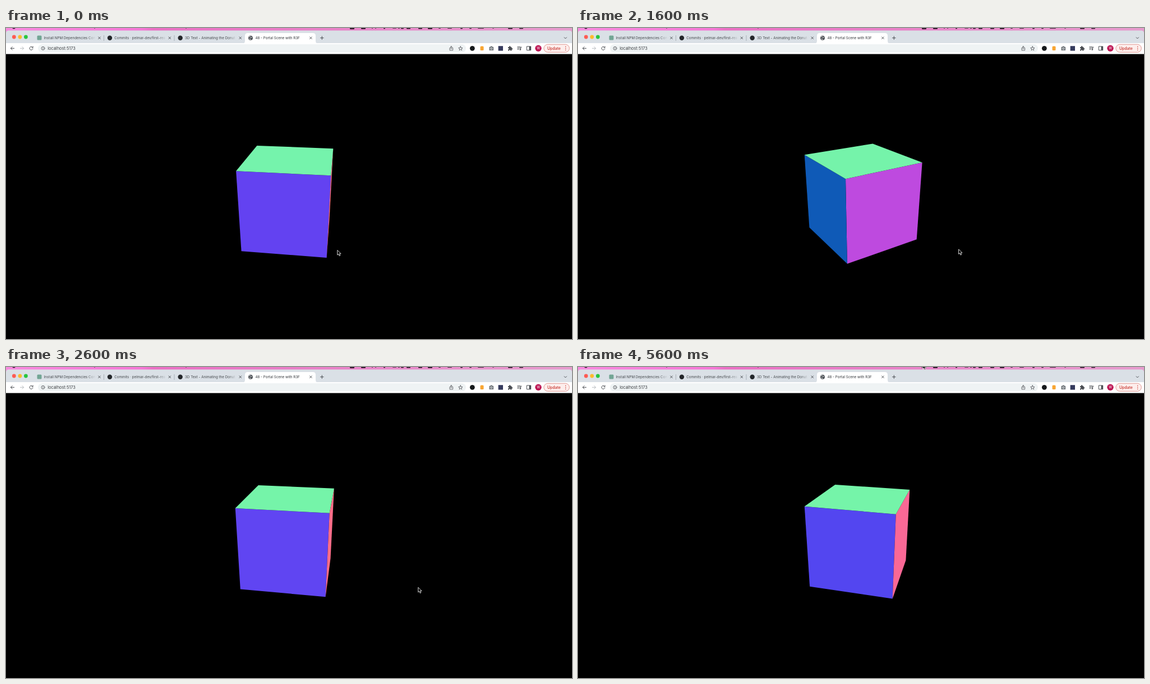
Write an HTML page that moves like this. It is 1009 px wide and 555 px high and loops after 5700 ms.

```html
<!DOCTYPE html>
<html lang="en">
<head>
<meta charset="utf-8">
<title>Portal Scene</title>
<style>
  html, body { margin: 0; width: 100%; height: 100%; overflow: hidden; background: #000; }
  svg { display: block; width: 1009px; height: 555px; }
  text { font-family: Inter, Roboto, sans-serif; font-size: 6.25px; }
  .line { fill: none; stroke: #484b50; stroke-width: 1; stroke-linecap: round; stroke-linejoin: round; }
  .thin { stroke-width: .8; }
</style>
</head>
<body>
<svg viewBox="0 0 1009 555">
  <defs>
    <linearGradient id="menu">
      <stop offset="0" stop-color="#f78ade"/>
      <stop offset=".24" stop-color="#f578d6"/>
      <stop offset=".26" stop-color="#ea70c4"/>
      <stop offset="1" stop-color="#e69ccd"/>
    </linearGradient>
  </defs>

  <!-- menu bar -->
  <rect width="1009" height="10" fill="url(#menu)"/>
  <circle cx="14" cy="-1.5" r="3" fill="#2c1026"/>
  <g id="marks" fill="#301a2b"></g>

  <!-- tab strip -->
  <path d="M0 28V9.500q0-5 5-5H1004q5 0 5 5V28z" fill="#dae0e6"/>
  <circle cx="14.3" cy="16" r="3.4" fill="#fe5b53"/>
  <circle cx="24.9" cy="16" r="3.4" fill="#fdbb2e"/>
  <circle cx="35.4" cy="16" r="3.4" fill="#28c63f"/>
  <path d="M421 28q5 0 5-5V14q0-5 5-5H547q5 0 5 5V23q0 5 5 5z" fill="#fff"/>
  <path d="M174.5 13v10M300 13v10" stroke="#9ea4ab" stroke-width=".8"/>
  <rect x="55.5" y="13.5" width="8" height="8" rx="1.5" fill="#72a594"/>
  <circle cx="185" cy="17.7" r="4.2" fill="#23262a"/>
  <circle cx="310.7" cy="17.7" r="4.2" fill="#23262a"/>
  <circle cx="436" cy="17.7" r="4" fill="#4b4f54"/>
  <path d="M433 16.2q2.2-2 3 .2t2.8-.4M433.6 19.6q2.2-1 2.6 1.4" fill="none" stroke="#fff" stroke-width=".9"/>
  <g id="tabs"></g>
  <path class="line" d="M560.5 17.7h5.6M563.3 14.9v5.6M995.2 16.8l2.1 2.1 2.1-2.1"/>

  <!-- toolbar -->
  <rect y="27" width="1009" height="20" fill="#fff"/>
  <rect x="57" y="29" width="763" height="14.6" rx="7.3" fill="#eff3f4"/>
  <path class="line" d="M14.6 36.3H8.5M11.2 33.5L8.4 36.3l2.8 2.8"/>
  <path class="line" style="stroke:#b9bdc1" d="M25.4 36.3h6.1M28.8 33.5l2.8 2.8-2.8 2.8"/>
  <path class="line" d="M47.4 34.4A3 3 0 1 0 48 37M48.1 33v2h-2"/>
  <circle class="line thin" cx="66" cy="36.3" r="3"/>
  <path class="line thin" d="M66 36v1.8M66 34.6v.1"/>
  <text x="74.2" y="38.8" fill="#3a3d41" style="font-size:7.4px">localhost:5173</text>
  <path class="line thin" d="M792.6 35.4H791V39.8h5.6V35.4H795M793.8 37.6v-5M792.3 34l1.5-1.5 1.5 1.5"/>
  <path class="line thin" d="M810.3 32.8l1 2.5 2.7.2-2.1 1.7.7 2.6-2.3-1.4-2.3 1.4.7-2.6-2.1-1.7 2.7-.2z"/>

  <!-- extensions -->
  <circle cx="831.3" cy="36.3" r="4.4" fill="#16191b"/>
  <rect x="845.5" y="32.5" width="6" height="7.5" rx="1.5" fill="#f8a533"/>
  <path d="M861.5 33.7h1.8l.8-1.2h2.4l.8 1.2h1.8v6.4h-7.6z" fill="#70767a"/>
  <circle cx="865.3" cy="36.8" r="1.6" fill="#70767a" stroke="#fff" stroke-width=".8"/>
  <rect x="877.6" y="32.2" width="8.4" height="8.4" fill="#353a5c"/>
  <path d="M895 34h2q-.3-2 1.2-2t1.2 2h2v2.1q1.8-.2 1.8 1.2t-1.8 1.2v2H899.2q.1-1.5-1-1.5t-1.1 1.5H895V38.3q1.5.1 1.5-1.1t-1.5-1.1z" fill="#484b50"/>
  <path class="line" d="M911.8 33.7h5M911.8 35.9h5M911.8 38.1h2.5M917.6 38.5v-4.3h1.5"/>
  <circle cx="916.8" cy="38.6" r="1.2" fill="#484b50"/>
  <rect class="line" x="928.7" y="32.9" width="7" height="6.8"/>
  <rect x="932.6" y="33" width="3" height="6.6" fill="#484b50"/>
  <circle cx="949" cy="36.3" r="5.7" fill="#bd1553"/>
  <text x="949" y="38.4" fill="#fff" text-anchor="middle" style="font-size:5.8px">W</text>
  <rect x="958.8" y="29.3" width="45.5" height="14" rx="7" fill="#fdeeec" stroke="#dd8e87" stroke-width=".9"/>
  <text x="965" y="38.8" fill="#c5302a" style="font-size:6.9px;font-weight:500">Update</text>
  <path d="M997.6 33.3v.01M997.6 36.3v.01M997.6 39.3v.01" stroke="#c5302a" stroke-width="1.5" stroke-linecap="round"/>

  <!-- page -->
  <rect y="46.5" width="1009" height="509" fill="#000"/>
  <g id="cube"></g>
  <path id="cursor" d="M0 0V8.6L1.9 6.8 3.4 10.2 5 9.5 3.6 6.3H6.3Z" fill="#000" stroke="#fff" stroke-width=".85" stroke-linejoin="round"/>
</svg>
<script>
const NS = 'http://www.w3.org/2000/svg';
const $ = id => document.getElementById(id);
const add = (parent, tag, attrs, text) => {
  const el = document.createElementNS(NS, tag);
  for (const k in attrs) el.setAttribute(k, attrs[k]);
  if (text) el.textContent = text;
  return parent.appendChild(el);
};

// Status icons cut off by the top edge: x, width, height
[[613, 8, 2.2], [633, 8, 2], [652, 2, 1], [658, 2, 1], [673, 3, 1.5], [689, 7, .8], [699, 3, 1],
 [704, 5, 1.4], [714, 7, 1.8], [735, 7, 1.8], [752, 8, 2], [771, 4, 1], [787, 8, 1], [810, 4, 1.4],
 [826, 4, 1.2], [841, 11, .9], [867, 3, .8], [895, 8, 1.8], [915, 7, 1.4], [157, 2, .8], [320, 2, .8]]
  .forEach(([x, w, h]) => add($('marks'), 'rect', { x, y: -2, width: w, height: h + 2, rx: 1 }));

// Tabs: text start, close button, title
[[67.7, 166.5, 'Install NPM Dependencies Com'],
 [193.3, 291.8, 'Commits · pelmar-dev/first-rea'],
 [319, 417.7, '3D Text - Animating the Donut'],
 [444.4, 543.4, '48 - Portal Scene with R3F']].forEach(([x, close, title], i) => {
  const fade = add($('tabs'), 'linearGradient',
    { id: 'fade' + i, gradientUnits: 'userSpaceOnUse', x1: x + 77, x2: x + 92 });
  const color = i < 3 ? '#43474b' : '#2f3236';
  add(fade, 'stop', { offset: 0, 'stop-color': color });
  add(fade, 'stop', { offset: 1, 'stop-color': color, 'stop-opacity': i < 3 ? 0 : 1 });
  add($('tabs'), 'text', { x, y: 20, fill: `url(#fade${i})` }, title);
  add($('tabs'), 'path', { class: 'line', d: `M${close - 1.8} 15.9l3.6 3.6m0-3.6l-3.6 3.6` });
});

// Monotone cubic through [time, value] points
function track(points) {
  const slope = points.slice(1).map((p, i) => (p[1] - points[i][1]) / (p[0] - points[i][0]));
  const tangent = points.map((_, i) => {
    const a = slope[i - 1] || 0, b = slope[i] || 0;
    return a * b > 0 ? 2 * a * b / (a + b) : 0;
  });
  return t => {
    if (t >= points[points.length - 1][0]) return points[points.length - 1][1];
    const i = points.findIndex(p => p[0] > t) - 1;
    const [t0, v0] = points[i], [t1, v1] = points[i + 1];
    const h = t1 - t0, u = (t - t0) / h, w = 1 - u;
    return v0 * w * w * (1 + 2 * u) + v1 * u * u * (3 - 2 * u)
      + h * u * w * (tangent[i] * w - tangent[i + 1] * u);
  };
}

const LOOP = 5700, STEP = 100, RELEASE = 1988;
const REST = { turn: 15.3, tilt: 22.5 };
const dragTurn = track([[0, 7.9], [600, 7.6], [1000, 5.5], [1300, -.9], [1600, -32.3], [1800, -42], [RELEASE, -44]]);
const dragTilt = track([[0, 24.1], [1300, 24.3], [1600, 23.3], [RELEASE, 24]]);
const cursorX = track([[0, 590.8], [1000, 598], [1300, 625.6], [1600, 678.6], [1800, 703], [2100, 734.8],
  [4700, 734.8], [4800, 735.8], [5000, 742], [5200, 700], [5400, 614.5]]);
const cursorY = track([[0, 396.5], [1300, 395.5], [1600, 394.9], [2100, 393.3],
  [4700, 393.3], [4800, 394], [5000, 444], [5200, 230], [5400, -5]]);

// Underdamped spring from 1 to 0
const MASS = 3.6, TENSION = 400, FRICTION = 26;
function spring(s) {
  const decay = FRICTION / (2 * MASS), w = Math.sqrt(TENSION / MASS - decay * decay);
  return Math.exp(-decay * s) * (Math.cos(w * s) + decay / w * Math.sin(w * s));
}

function pose(t) {
  if (t < RELEASE) return [dragTurn(t), dragTilt(t)];
  const k = spring((t - RELEASE) / 1000);
  return [REST.turn + (dragTurn(RELEASE) - REST.turn) * k,
          REST.tilt + (dragTilt(RELEASE) - REST.tilt) * k];
}

const HALF = .75, DIST = 6.403, FOCAL = 618.5, CX = 505, CY = 302.7;
const rad = deg => deg * Math.PI / 180;
const faces = Array.from({ length: 5 }, () => add($('cube'), 'polygon', {}));

function drawCube(turn, tilt) {
  const c = Math.cos(rad(tilt)), s = Math.sin(rad(tilt));
  const view = (x, y, z) => [x, y * c - z * s, z * c + y * s];
  const corner = (deg, y) => {
    const a = rad(deg - turn), r = HALF * Math.SQRT2;
    const [vx, vy, vz] = view(r * Math.sin(a), y, r * Math.cos(a));
    const k = FOCAL / (DIST - vz);
    return (CX + vx * k).toFixed(2) + ',' + (CY - vy * k).toFixed(2);
  };
  const paint = (face, corners, normal) => {
    const rgb = normal.map(n => Math.round(255 * (n * .5 + .5) ** 1.12));
    face.setAttribute('points', corners.join(' '));
    face.setAttribute('fill', `rgb(${rgb})`);
  };
  for (let i = 0; i < 4; i++) {
    const mid = i * 90, a = rad(mid - turn);
    const visible = Math.cos(a) * DIST * c > HALF;
    faces[i].setAttribute('visibility', visible ? 'visible' : 'hidden');
    paint(faces[i],
      [corner(mid - 45, HALF), corner(mid + 45, HALF), corner(mid + 45, -HALF), corner(mid - 45, -HALF)],
      view(Math.sin(a), 0, Math.cos(a)));
  }
  paint(faces[4], [45, 135, 225, 315].map(d => corner(d, HALF)), view(0, 1, 0));
}

function render(now) {
  const t = Math.floor(now % LOOP / STEP) * STEP;
  drawCube(...pose(t));
  $('cursor').setAttribute('transform', `translate(${cursorX(t)} ${cursorY(t)})`);
}

const start = performance.now();
function tick() {
  render(performance.now() - start);
  requestAnimationFrame(tick);
}
tick();
</script>
</body>
</html>
```
